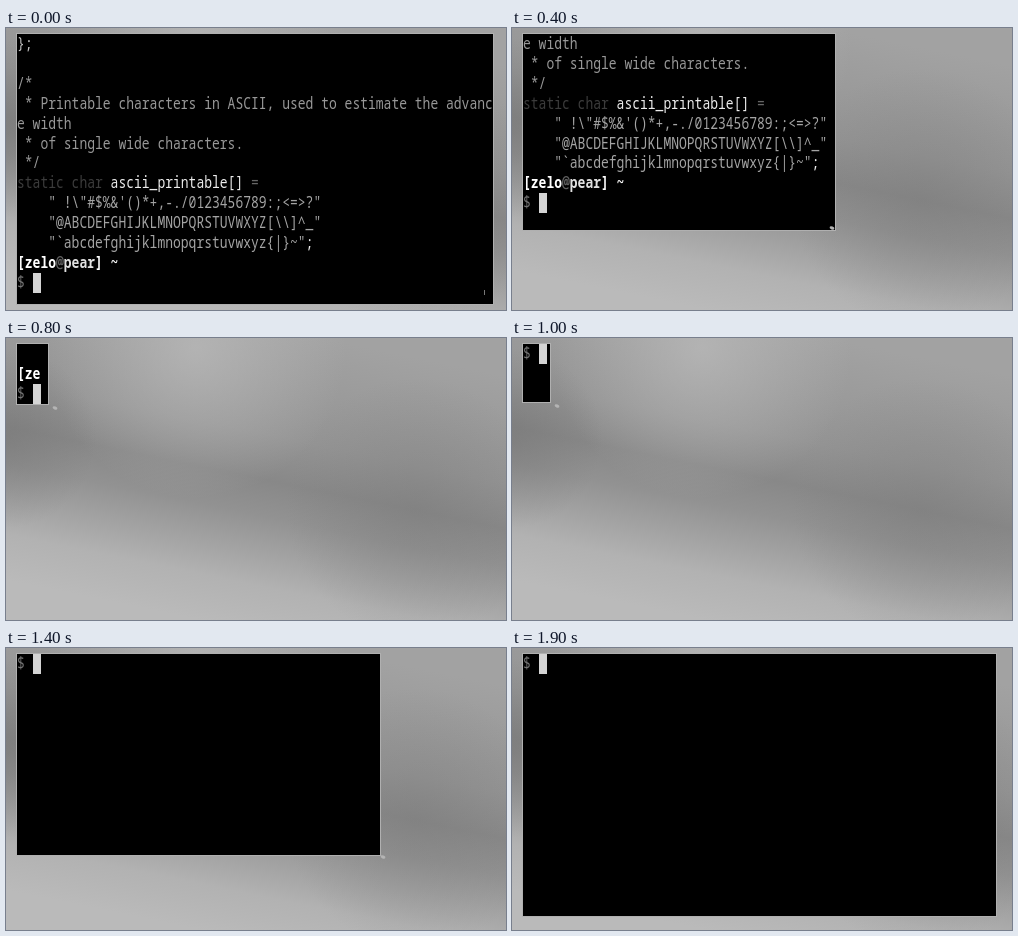
An HTML page with a canvas for the animation above (2000 ms loop, 500 px wide and 282 px high).

```html
<!DOCTYPE html>
<html lang="en">
<head>
<meta charset="utf-8">
<title>Terminal resize</title>
<style>
  html, body { margin: 0; width: 100%; height: 100%; overflow: hidden; background: #999; }
  canvas { display: block; }
</style>
</head>
<body>
<canvas id="stage" width="500" height="282"></canvas>
<script>
const ctx = document.getElementById('stage').getContext('2d');
const LEFT = 11, TOP = 6, CELL_W = 7.8, CELL_H = 19.9;
const STEP = 100;

// Lower right corner of the window at each step.
const corners = [
  [487, 276], [476, 267], [440, 249], [387, 226], [323, 202],
  [232, 178], [139, 153], [74, 112], [42, 66], [33, 44],
  [38, 64], [112, 110], [218, 152], [308, 184], [374, 207],
  [422, 232], [456, 250], [478, 262], [483, 267], [484, 268]
];
const CLEARED_AT = 9;

const DARK = '#3c3c3c', COMMENT = '#989898', STRING = '#a4a4a4', BRIGHT = '#ececec';
const comment = text => [[text, COMMENT]];
const string = text => [['    ' + text, STRING]];
const prompt = [['$ ', '#747474']];

// Every line is a list of runs: text, colour, bold.
const log = [
  [['};', '#c4c4c4']],
  [],
  comment('/*'),
  comment(' * Printable characters in ASCII, used to estimate the advanc'),
  comment('e width'),
  comment(' * of single wide characters.'),
  comment(' */'),
  [['static char ', DARK], ['ascii_printable[]', BRIGHT], [' =', '#666']],
  string(`" !\\"#$%&'()*+,-./0123456789:;<=>?"`),
  string('"@ABCDEFGHIJKLMNOPQRSTUVWXYZ[\\\\]^_"'),
  [...string('"`abcdefghijklmnopqrstuvwxyz{|}~"'), [';', BRIGHT]],
  [['[zelo', '#fff', true], ['@', '#606060', true], ['pear', '#e0e0e0', true], ['] ~', '#fff', true]],
  prompt
];

function fillGradient(gradient, stops) {
  for (const [at, color] of stops) gradient.addColorStop(at, color);
  ctx.fillStyle = gradient;
  ctx.fillRect(0, 0, 500, 282);
}

function glow(x, y, radius, level, alpha) {
  const rgb = `${level},${level},${level}`;
  fillGradient(ctx.createRadialGradient(x, y, 0, x, y, radius),
    [[0, `rgba(${rgb},${alpha})`], [1, `rgba(${rgb},0)`]]);
}

function drawWallpaper() {
  fillGradient(ctx.createLinearGradient(280, -7, 220, 287), [
    [0, '#a2a2a2'], [.35, '#949494'], [.5, '#888'],
    [.62, '#929292'], [.85, '#b2b2b2'], [1, '#bababa']
  ]);
  glow(190, 10, 150, 188, .7);
  glow(410, 170, 130, 122, .4);
  glow(0, 100, 90, 116, .5);
}

function drawLine(runs, row, columns) {
  let column = 0;
  for (const [text, color, bold] of runs) {
    const visible = text.slice(0, Math.max(0, columns - column));
    ctx.save();
    ctx.translate(LEFT + column * CELL_W, TOP + row * CELL_H + 15);
    ctx.scale(.8125, 1); // narrow terminal face
    ctx.font = `${bold ? 'bold ' : ''}16px "Noto Sans Mono", "DejaVu Sans Mono", monospace`;
    ctx.fillStyle = color;
    ctx.fillText(visible, 0, 0);
    ctx.restore();
    column += text.length;
  }
}

function drawPointer(step, right, bottom) {
  if (step === 0) {
    ctx.fillStyle = '#777';
    ctx.fillRect(478, 262, 1, 5);
  } else if (step < 16) {
    const [dx, dy] = step < 8 ? [-3, -2] : step < 12 ? [7, 4] : [3, 2];
    ctx.fillStyle = '#b4b4b4';
    ctx.beginPath();
    ctx.ellipse(right + dx, bottom + dy, 2.5, 1.5, .4, 0, Math.PI * 2);
    ctx.fill();
  }
}

function draw(step) {
  const [right, bottom] = corners[step];
  const width = right - LEFT, height = bottom - TOP;
  const columns = Math.floor(width / CELL_W + .01);
  const rows = Math.max(1, Math.floor(height / CELL_H));
  const lines = step < CLEARED_AT ? log.slice(-rows) : [prompt];

  drawWallpaper();
  ctx.fillStyle = '#b0b0b0';
  ctx.fillRect(LEFT - 1, TOP - 1, width + 2, height + 2);
  ctx.fillStyle = '#000';
  ctx.fillRect(LEFT, TOP, width, height);

  ctx.save();
  ctx.beginPath();
  ctx.rect(LEFT, TOP, width, height);
  ctx.clip();
  lines.forEach((line, row) => drawLine(line, row, columns));
  ctx.fillStyle = '#d4d4d4';
  ctx.fillRect(27, Math.round(TOP + (lines.length - 1) * CELL_H), 8, 20);
  ctx.restore();

  drawPointer(step, right, bottom);
}

const start = performance.now();
function tick() {
  const elapsed = performance.now() - start;
  draw(Math.floor(elapsed / STEP) % corners.length);
  requestAnimationFrame(tick);
}
tick();
</script>
</body>
</html>
```
